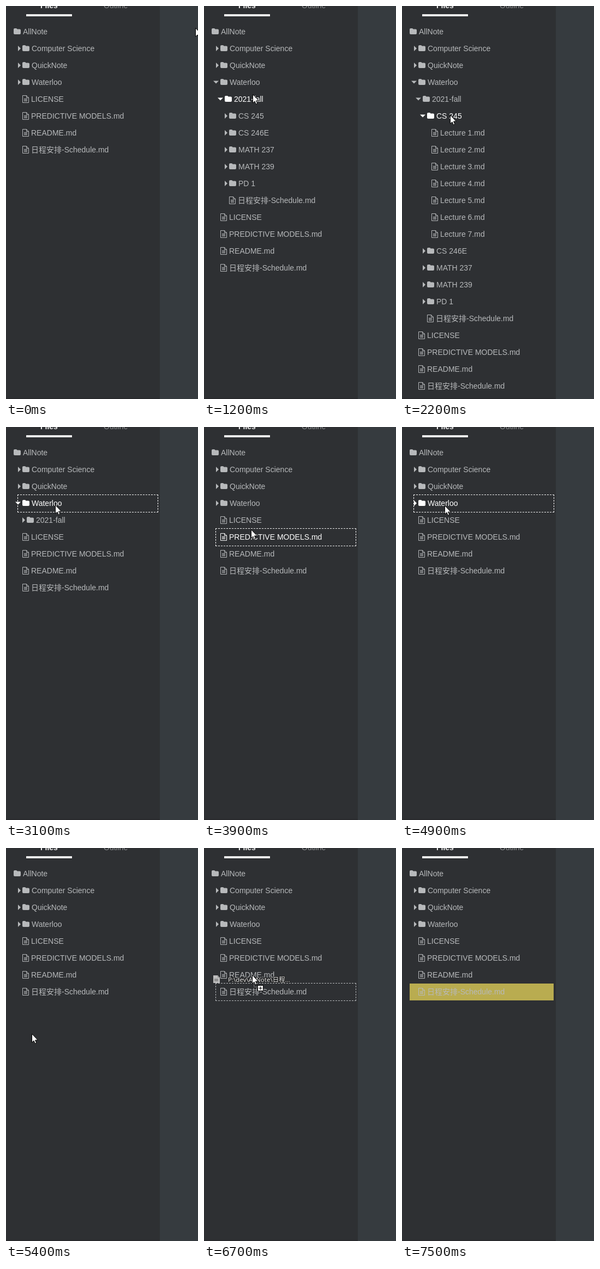
Recreate the animation shown at these times as an HTML page. Size 352x722 px, loop 7600 ms.

```html
<!DOCTYPE html>
<html lang="en">
<head>
<meta charset="utf-8">
<title>File tree</title>
<style>
html, body { margin: 0; width: 100%; height: 100%; overflow: hidden; background: #363b3f; }
svg { position: absolute; left: 0; top: 0; width: 352px; height: 722px; }
text { white-space: pre; font-family: "Liberation Sans", Arial, "Noto Sans CJK SC", "Noto Sans CJK", sans-serif; }
#tree { font-size: 14px; }
#menu { font-size: 12px; fill: #d3d5d7; }
#focus { position: absolute; height: 31px; outline: 1px dashed; }
#ghost text { font: 11.5px "Noto Sans", "Noto Sans CJK SC", "Noto Sans CJK", sans-serif; }
</style>
</head>
<body>
<svg viewBox="0 0 352 722">
  <rect width="282" height="722" fill="#2e3033"/>
  <rect y="720" width="282" height="2" fill="#292a2d"/>
  <g font-size="14">
    <text x="63" y="4" font-weight="bold" fill="#f2f2f2">Files</text>
    <text x="179" y="4" fill="#8d8f91">Outline</text>
  </g>
  <rect x="37" y="15" width="84" height="4" fill="#efefef"/>
  <rect id="flash" x="14" y="249" width="264" height="31" fill="#b9ac50"/>
  <g id="tree"></g>
</svg>
<div id="focus"></div>
<svg viewBox="0 0 352 722">
  <g id="menu">
    <rect x="79" y="189" width="253" height="442" rx="22" fill="#000" opacity=".07"/>
    <rect x="87" y="188" width="232" height="422" rx="3" fill="#404347"/>
  </g>
  <g id="ghost">
    <path d="M-71 1h8l4 4v10h-12z" fill="#bdbdbd"/>
    <path d="M-63 1v4h4z" fill="#8a8a8a"/>
    <rect x="-69" y="7" width="7" height="5" fill="#909090"/>
    <text x="-44" y="13" fill="#e4e4e4" stroke="#222" stroke-width="2" paint-order="stroke">P:\dev\AllNote\日程...</text>
  </g>
  <g id="cursor">
    <path d="M.5 .5V16.2L4 12.9 6.3 18.2 8.8 17.1 6.5 12H11.4Z" fill="#fff" stroke="#000"/>
    <g id="badge">
      <path d="M2.5 17.5V23.5H10" fill="none" stroke="#000" stroke-dasharray="1 1"/>
      <path d="M3.5 18V22.5H10" fill="none" stroke="#ddd" stroke-dasharray="1 1"/>
      <rect x="10.5" y="19.5" width="10" height="10" fill="#fff" stroke="#000"/>
      <path d="M12.5 24.5h6M15.5 21.5v6" stroke="#000"/>
    </g>
  </g>
</svg>
<script>
const STEP = 100, LOOP = 7600;
const GREY = '#b7b9bb', WHITE = '#fff';
const $ = id => document.getElementById(id);

const file = (id, name = id) => ({ id, name });
const dir = (id, ...kids) => ({ id, name: id, kids });
const schedule = '日程安排-Schedule.md';
const lectures = Array.from({ length: 7 }, (_, i) => file(`Lecture ${i + 1}.md`));
const nodes = [
  dir('Computer Science'),
  dir('QuickNote'),
  dir('Waterloo',
    dir('2021-fall',
      dir('CS 245', ...lectures), dir('CS 246E'), dir('MATH 237'),
      dir('MATH 239'), dir('PD 1'), file('term', schedule))),
  file('LICENSE'), file('PREDICTIVE MODELS.md'), file('README.md'), file('plan', schedule)
];

// [node, first step, step after the last]
const opened = [['Waterloo', 7, 32], ['2021-fall', 12, 28], ['CS 245', 20, 24]];
const focused = [
  ['Waterloo', 6, 7], ['2021-fall', 11, 12], ['CS 245', 19, 20], ['CS 245', 23, 24],
  ['2021-fall', 27, 28], ['Waterloo', 31, 32], ['PREDICTIVE MODELS.md', 39, 48],
  ['Waterloo', 49, 50], ['plan', 58, 75]
];

// pointer: step, x, y
const path = `0 347 40, 1 272 56, 2 200 84, 3 150 108, 4 118 127, 5 102 139, 6 98 142,
  8 96 146, 10 93 160, 12 89 162, 15 92 168, 17 92 168, 18 90 192, 20 88 200, 24 88 200,
  25 88 195, 26 89 175, 28 90 168, 29 90 152, 31 90 143, 33 86 164, 35 85 202, 37 86 188,
  40 86 188, 42 80 158, 44 78 144, 49 78 144, 50 76 150, 52 56 270, 54 47 341, 55 54 320,
  57 68 272, 58 70 264, 60 70 258, 63 66 210, 64 62 236, 65 64 249, 67 88 233, 68 120 205,
  70 248 89, 71 262 96, 72 340 47, 73 400 40`
  .split(',').map(k => k.trim().split(' ').map(Number));

function pointer(n) {
  const i = path.findIndex(k => k[0] > n);
  if (i < 0) return path[path.length - 1].slice(1);
  const [a, b] = [path[i - 1], path[i]];
  const u = (n - a[0]) / (b[0] - a[0]);
  return [1, 2].map(j => Math.round(a[j] + (b[j] - a[j]) * u));
}

const within = (n, a, b) => n >= a && n < b;
const active = (list, n) => list.filter(([, a, b]) => within(n, a, b)).map(r => r[0]);
const show = (id, on) => { $(id).style.display = on ? '' : 'none'; };
const label = (x, y, s) => `<text x="${x}" y="${y}">${s}</text>`;

function layout(open) {
  const rows = [{ id: 'root', name: 'AllNote', kids: [], x: 14, y: 47 }];
  const walk = (list, x) => list.forEach(node => {
    const isOpen = open.includes(node.id);
    rows.push({ ...node, x, y: 47 + 31 * rows.length, isOpen });
    if (isOpen) walk(node.kids, x + 8);
  });
  walk(nodes, 30);
  return rows;
}

const folderIcon = (x, y) =>
  `<path d="M${x} ${y - 4}q0-2 2-2h2.5q1.8 0 2 1.6h4.5q2 0 2 2v5.4q0 2-2 2h-9q-2 0-2-2z"/>`;
const fileIcon = (x, y) =>
  `<path transform="translate(${x} ${y - 7})" fill="none" stroke="currentColor"
    d="M.5 .5H7.5L11.5 4.5V13.5H.5ZM7.5 .5V4.5H11.5M3 6.5H9M3 8.5H9M3 10.5H9"/>`;
const caret = ({ x, y, isOpen }) => isOpen
  ? `<path d="M${x - 13} ${y - 2.5}h10l-5 5z"/>`
  : `<path d="M${x - 8} ${y - 5}v10l5-5z"/>`;

function drawRow(row, hover) {
  const { x, y, id, name, kids } = row;
  const color = hover ? WHITE : GREY;
  const icon = kids
    ? (id === 'root' ? '' : caret(row)) + folderIcon(x, y)
    : fileIcon(x, y);
  return `<g fill="${color}" color="${color}">${icon}${label(x + (kids ? 17 : 16), y + 5, name)}</g>`;
}

function buildMenu() {
  const items = [
    [210, 'Open'], [238, 'Open in New Window'], [274, 'New File'], [302, 'New Folder'],
    [339, 'Search'], [375, 'Articles (List View)'], [403, 'File Tree (Tree View)'],
    [440, 'Rename'], [467, 'Duplicate'], [504, 'Delete'],
    [541, 'Properties'], [568, 'Copy File Path'], [596, 'Open File Location']
  ];
  const lines = [251, 316, 352, 417, 481, 518];
  $('menu').innerHTML += items.map(([y, s]) => label(119, y, s)).join('') + label(101, 403, '√') +
    lines.map(y => `<rect x="87" y="${y}" width="232" height="1" fill="#54575a"/>`).join('');
}

function draw(n) {
  const [px, py] = pointer(n);
  const drag = within(n, 60, 71);
  const rows = layout(active(opened, n));
  const over = row => !drag && px < 279 && py >= row.y - 15.5 && py < row.y + 15.5;
  $('tree').innerHTML = rows.map(r => drawRow(r, over(r))).join('');

  const focus = rows.find(r => r.id === active(focused, n)[0]);
  show('focus', focus);
  if (focus) Object.assign($('focus').style, {
    left: focus.x - 8 + 'px',
    top: focus.y - 15 + 'px',
    width: 286 - focus.x + 'px',
    color: over(focus) ? WHITE : GREY
  });

  show('flash', n === 75);
  show('menu', within(n, 40, 48));
  show('ghost', drag);
  show('badge', drag);
  for (const id of ['cursor', 'ghost'])
    $(id).setAttribute('transform', `translate(${px} ${py})`);
}

buildMenu();
const start = performance.now();
let last = -1;
function tick() {
  const n = Math.floor((performance.now() - start) % LOOP / STEP);
  if (n !== last) draw(last = n);
  requestAnimationFrame(tick);
}
tick();
</script>
</body>
</html>
```
